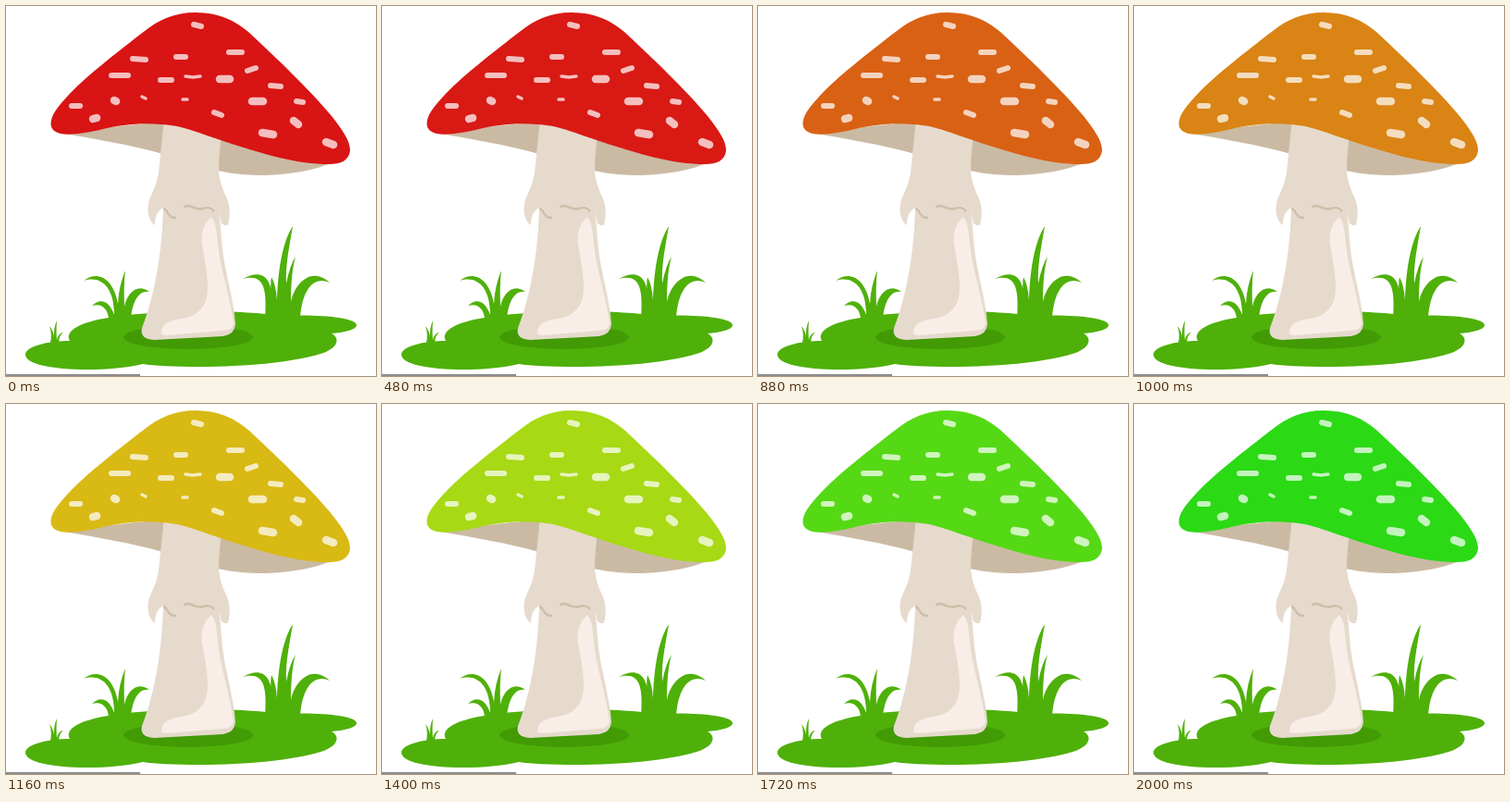
Write an HTML page that moves like this. It is 400 px wide and 400 px high and loops after 3.04 s.

```html
<!DOCTYPE html>
<html lang="en">
<head>
<meta charset="utf-8">
<title>Mushroom</title>
<style>
html, body { margin: 0; width: 100%; height: 100%; overflow: hidden; background: #fff; }
svg { display: block; width: 100vw; height: 100vh; }
</style>
</head>
<body>
<svg viewBox="0 0 400 400">
  <!-- ground and grass -->
  <g fill="#4fb00a">
    <path d="M21 377C21 368 45 362 69 362C62 350 85 340 118 336C150 331 190 330 210 330C250 330 275 332 300 335C340 333 379 337 379 345C379 350 365 353 352 354C364 361 355 372 340 376C310 385 260 390 210 390C180 390 160 389 148 387C130 391 110 393 88 393C50 393 21 387 21 377Z"/>
    <path d="M111 338C110 328 104 321 93 324C102 315 112 319 117 334C117 303 102 291 84 297C97 286 116 292 121 322Q122 302 129 286Q127 302 128 325C131 310 142 299 155 309C144 307 137 318 135 338Z"/>
    <path d="M280 338C283 300 276 290 256 295C274 285 287 290 288 318Q285 302 287 293Q292 302 293 318C294 285 299 255 310 238C306 262 302 280 303 300Q307 280 313 271Q308 288 308 320C312 300 330 281 350 299C333 291 320 306 318 338Z"/>
    <path d="M48 364Q50 355 47 346Q52 352 52 361Q51 348 55 340Q54 352 55 361Q57 353 62 353Q58 355 57 363Z"/>
  </g>
  <ellipse cx="197" cy="358" rx="70" ry="13" fill="#429a05"/>

  <!-- underside, stem and frill -->
  <path fill="#cbbaa3" d="M58 137C98 144 138 151 166 159L229 178C245 182 265 183 280 183C310 182 335 177 354 169L232 140L168 125Z"/>
  <g fill="#e6dacd">
    <path d="M170 216C169 262 162 310 147 348Q144 360 160 361L235 357Q247 355 248 344C246 315 236 285 234 262C232 245 232 230 229 216Z"/>
    <path d="M171 122L233 138C231 155 230 170 230 178C231 190 234 198 238 206C242 214 243 228 240 236C237 239 233 236 232 232C232 226 229 219 225 218L170 218C163 222 161 228 161 237C155 233 152 224 154 213C157 203 163 194 165 180Z"/>
  </g>
  <path fill="#f8eee7" d="M222 228C214 235 210 245 212 258C215 275 218 290 218 305C218 322 210 333 195 337C182 339 172 341 169 348C167 355 168 356 174 356L234 351Q246 350 246 343C243 318 233 288 230 265C228 250 228 235 222 228Z"/>
  <path fill="none" stroke="#cfbfa9" stroke-width="2.5" d="M170 219C175 219 174 230 184 229M192 217C202 213 204 222 213 219C219 217 222 218 225 222"/>

  <!-- cap and spots -->
  <path id="cap" d="M48.5 128C48 118 57 108 66 98C84 78 120 50 150 27C165 15 182 7 205 7C230 7 248 16 262 28C290 54 330 92 352 119C364 134 372 146 372 156C371 167 362 171 349 171C315 171 280 161 232 145C205 136 190 129 168 128C145 126 122 129 105 133C88 137 70 140 59 138C52 136 49 133 48.5 128Z"/>
  <g fill="none" stroke="#fff" stroke-opacity=".72" stroke-linecap="round">
    <path stroke-width="3.5" d="M147 98l4 2M194 76l8 1 8-1M191 101h5"/>
    <path stroke-width="6" d="M203 20l8 2M241 50h14M137 57l14 1M184 55h10M261 70l9-3M114 75h18M167 80h12M286 86l11 1M314 103l7 1M71 108h9M225 115l8 3"/>
    <path stroke-width="8.5" d="M231 79h11M266 103h12M117 102l2 1M277 137l12 2M346 147l8 3M94 122l4-1M311 124l5 4"/>
  </g>
  <path fill="#8c8c8c" d="M0 398H145V400H0Z"/>
</svg>
<script>
const STEP = 40, LOOP = 3040, FADE_START = 440, FADE_END = 2000;
const GREEN_HUE = 113;
const cap = document.getElementById('cap');

// Gentle ease in and out
const ease = t => t - 0.075 * Math.sin(2 * Math.PI * t);

function draw() {
  const time = Math.floor(performance.now() % LOOP / STEP) * STEP;
  const progress = (time - FADE_START) / (FADE_END - FADE_START);
  const hue = GREEN_HUE * ease(Math.min(1, Math.max(0, progress)));
  cap.setAttribute('fill', `hsl(${hue}, 83%, 46.5%)`);
  requestAnimationFrame(draw);
}
draw();
</script>
</body>
</html>
```
